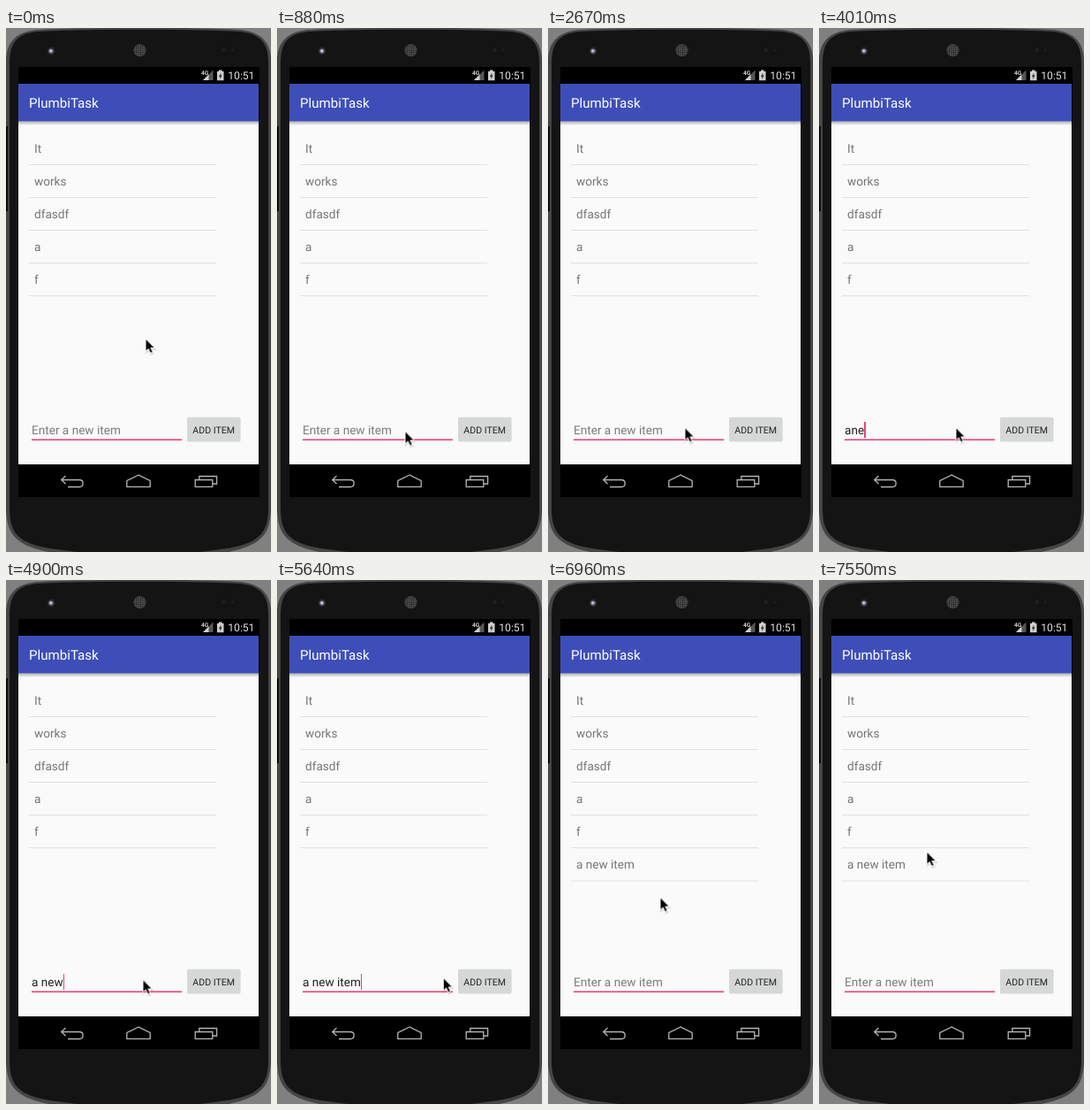
Write an HTML page that moves like this. It is 300 px wide and 592 px high and loops after 8 s.

```html
<!DOCTYPE html>
<html lang="en">
<head>
<meta charset="utf-8">
<title>To-do list demo</title>
<style>
  html, body { margin: 0; width: 100%; height: 100%; overflow: hidden; background: #808080; }
  body { position: relative; font-family: Roboto, "Noto Sans", sans-serif; }
  svg { position: absolute; left: 0; top: 0; display: block; }
  text { font-family: Roboto, "Noto Sans", sans-serif; text-rendering: geometricPrecision; }
  .item { font-size: 13.6px; fill: #757575; }
  .rule { stroke: #e1e1e1; stroke-width: 1; }
  .icon { fill: none; stroke: #b4b4b4; stroke-width: 1.3; }

  .field {
    position: absolute; left: 29px; top: 446px; width: 170px; height: 18px;
    font-size: 13.6px; line-height: 18px; white-space: pre; color: #212121;
    text-rendering: geometricPrecision;
  }
  .hint { position: absolute; left: 0; top: 0; color: #7b7b7b; }
  .typed::before { content: ""; }
  .caret { position: absolute; top: -1px; width: 1.5px; height: 18px; background: #e5447f; }

  .hint, .typed::before, .caret, .added, .pointer {
    animation: 8s step-end infinite;
  }
  .hint { animation-name: hint; }
  .typed::before { animation-name: type; }
  .caret { animation-name: blink; }
  .added { animation-name: add; }
  .pointer { animation-name: point; }

  @keyframes hint {
    0%, 76% { visibility: visible; }
    46.375% { visibility: hidden; }
  }
  @keyframes type {
    0%, 76%, 100% { content: ""; }
    46.375% { content: "a"; }
    48.25% { content: "an"; }
    50.125% { content: "ane"; }
    51.875% { content: "anew"; }
    55.625% { content: "an"; }
    57.5% { content: "a"; }
    59.375% { content: "a n"; }
    61.125% { content: "a new"; }
    63% { content: "a new i"; }
    64.875% { content: "a new ite"; }
    66.75% { content: "a new item"; }
  }
  @keyframes blink {
    0%, 9.25%, 22.25%, 33.375%, 83.375%, 94.375%, 100% { visibility: hidden; }
    3.75%, 14.75%, 27.75%, 39%, 88.875% { visibility: visible; }
  }
  @keyframes add {
    0%, 100% { visibility: hidden; }
    76% { visibility: visible; }
  }
  @keyframes point {
    0%, 100% { transform: translate(158.5px, 352px); }
    1.875% { transform: translate(159px, 357px); }
    3.75% { transform: translate(163px, 395px); }
    5.5% { transform: translate(165px, 446px); }
    7.375% { transform: translate(160px, 484px); }
    9.25% { transform: translate(150px, 473px); }
    11% { transform: translate(145.5px, 456.5px); }
    12.875% { transform: translate(157px, 453px); }
    14.75% { transform: translate(166px, 452px); }
    18.5% { transform: translate(164px, 452px); }
    20.375% { transform: translate(159px, 452px); }
    22.25% { transform: translate(155.5px, 452.5px); }
    70.5% { transform: translate(188.8px, 450.5px); }
    72.375% { transform: translate(220px, 456px); }
    74.125% { transform: translate(236px, 462px); }
    76% { transform: translate(236px, 461px); }
    77.75% { transform: translate(235px, 460px); }
    83.375% { transform: translate(212px, 434px); }
    85.125% { transform: translate(162px, 389px); }
    87% { transform: translate(127.5px, 359.5px); }
    88.875% { transform: translate(118px, 340px); }
    90.75% { transform: translate(117px, 322px); }
    92.5% { transform: translate(120px, 312px); }
    94.375% { transform: translate(122.5px, 308px); }
  }
</style>
</head>
<body>
<svg width="300" height="592" viewBox="0 0 300 592">
  <defs>
    <linearGradient id="shade" x1="0" y1="0" x2="0" y2="1">
      <stop offset="0" stop-color="#000" stop-opacity=".3"/>
      <stop offset="1" stop-color="#000" stop-opacity="0"/>
    </linearGradient>
    <pattern id="mesh" width="2.4" height="2.4" patternUnits="userSpaceOnUse">
      <circle cx="1.2" cy="1.2" r=".75" fill="#161616"/>
    </pattern>
  </defs>

  <!-- phone body -->
  <path fill="#454545" d="M0 34C2 14 12 5 34 2C90-1 210-1 266 2C288 5 298 14 300 34V546C298 574 288 584 252 592H48C12 584 2 574 0 546Z"/>
  <path fill="#141414" d="M4 40C4 16 13 6 36 4C92 1 208 1 264 4C287 6 297 16 297 40V542C297 570 287 582 250 588L220 592H80L50 588C13 582 4 570 4 542Z"/>
  <rect y="111" width="2" height="96" fill="#0b0b0b"/>

  <circle cx="51" cy="26" r="4.2" fill="#2a2a2e"/>
  <circle cx="51" cy="26" r="2.6" fill="#70768f"/>
  <circle cx="50.7" cy="25.7" r="1.5" fill="#c3c6d3"/>
  <circle cx="151.5" cy="25.3" r="7" fill="#505050"/>
  <circle cx="151.5" cy="25.3" r="7" fill="url(#mesh)"/>
  <circle cx="246.5" cy="25" r="2.2" fill="#202020"/>
  <circle cx="256.5" cy="25" r="1.6" fill="#202020"/>

  <!-- screen -->
  <rect x="14" y="44" width="273" height="486"/>
  <rect x="14" y="63" width="272" height="430" fill="#fafafa"/>
  <rect x="14" y="105.5" width="272" height="4.5" fill="url(#shade)"/>
  <rect x="14" y="63" width="272" height="42.5" fill="#3e4eb8"/>
  <text x="26" y="90" font-size="15.1" fill="#fff">PlumbiTask</text>

  <!-- status bar -->
  <path fill="#555" d="M234.5 47.5V59H223Z"/>
  <path fill="#d0d0d0" d="M229.5 52.5V59H223Z"/>
  <text x="221" y="53" font-size="6.5" font-weight="700" fill="#d8d8d8">4G</text>
  <path fill="#cfcfcf" d="M241 47.5H244.5V49H246.5V59.3H239V49H241Z"/>
  <path fill="#333" d="M243.5 50.5L240.8 55H242.4L242 58L244.8 53.5H243.1Z"/>
  <text x="251.3" y="58" font-size="12.1" fill="#e2e2e2">10:51</text>

  <!-- list -->
  <g class="item">
    <text x="32" y="141">It</text>
    <text x="32" y="178">works</text>
    <text x="32" y="215">dfasdf</text>
    <text x="32" y="252">a</text>
    <text x="32" y="289">f</text>
  </g>
  <path class="rule" d="M26 154.5H238M26 191.5H238M26 228.5H238M26 265.5H238M26 302.5H238"/>
  <g class="added">
    <text class="item" x="32" y="326.3">a new item</text>
    <path class="rule" d="M26 340H238"/>
  </g>

  <!-- entry row -->
  <rect x="29" y="464.4" width="170" height="1.6" fill="#ea4480"/>
  <rect x="205" y="440.4" width="60.5" height="27" rx="1.5" fill="#000" opacity=".12"/>
  <rect x="205" y="439.8" width="60.3" height="26.9" rx="1.5" fill="#d6d7d7"/>
  <text x="211.3" y="457.7" font-size="10.58" fill="#212121">ADD ITEM</text>

  <!-- navigation bar -->
  <g class="icon" transform="translate(0 .5)">
    <path d="M67.5 505.5L62.7 510L67.5 514.5M62.7 510H83C88.5 510 88.5 518 83 518H70"/>
    <path d="M150 504.5L136.8 511V517.8H163.2V511Z"/>
    <path d="M214.2 510H233.8V517.8H214.2ZM218.8 509.5V506H238.6V514.5H234"/>
  </g>
</svg>

<div class="field"><span class="hint">Enter a new item</span><span class="typed"></span><i class="caret"></i></div>

<svg width="300" height="592" viewBox="0 0 300 592">
  <g class="pointer">
    <path transform="translate(.5 1.2)" fill="#000" stroke="#000" stroke-width="2.2" opacity=".13" d="M0 0V13L3 10.2L5.4 15.4L7.4 14.5L5.1 9.5H9.2Z"/>
    <path fill="#000" stroke="#fff" stroke-width="1.9" paint-order="stroke" stroke-linejoin="round" d="M0 0V12.4L2.9 9.8L5.2 14.8L7.1 14L4.8 9.1H8.9Z"/>
  </g>
</svg>
</body>
</html>
```
